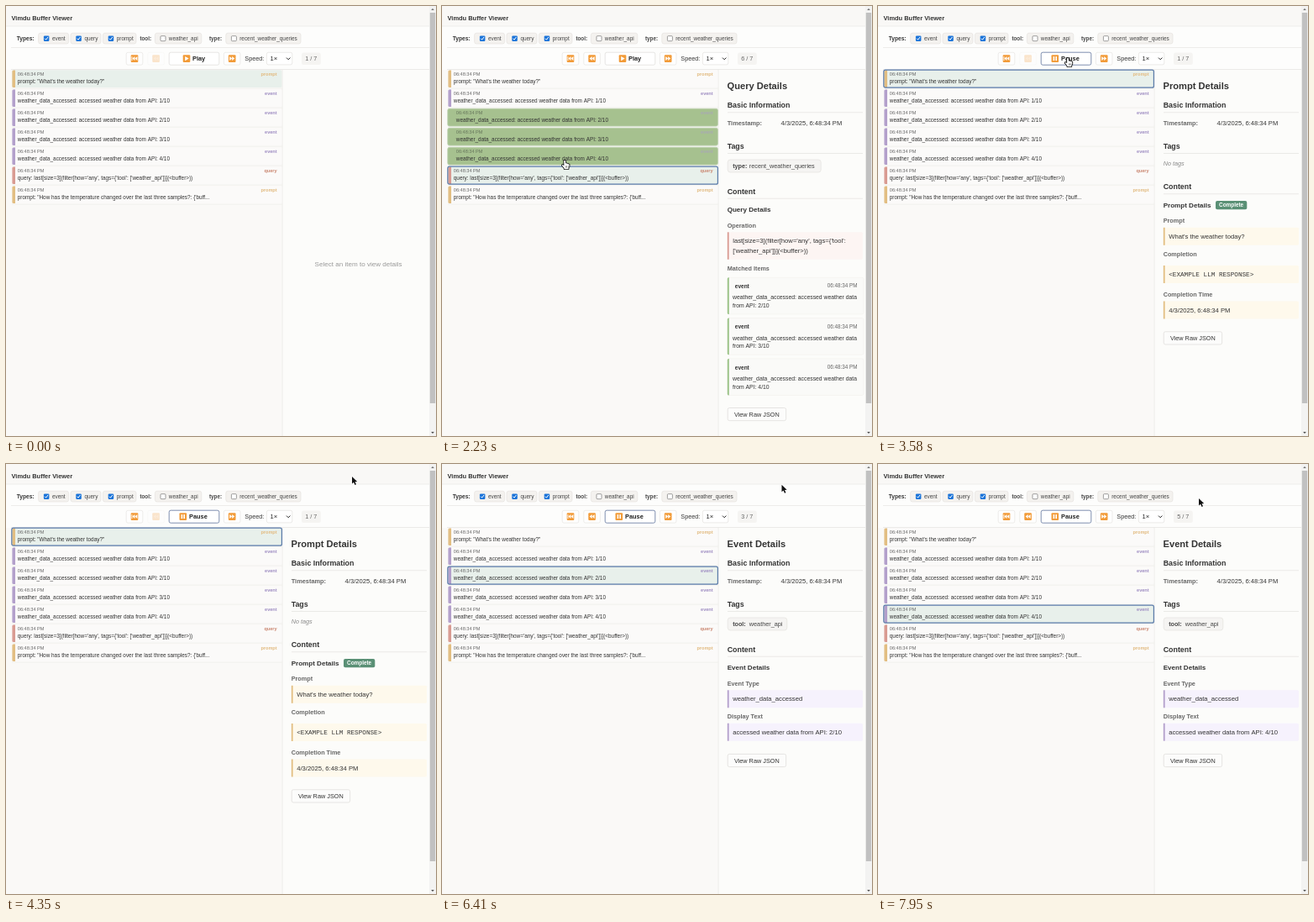
Write an HTML page with a canvas that moves like this. It is 512 by 512 pixels and loops after 8 s.

```html
<!DOCTYPE html>
<html lang="en">
<head>
<meta charset="utf-8">
<title>Buffer Viewer</title>
<style>
html, body { margin: 0; width: 100%; height: 100%; overflow: hidden; background: #faf9f7; }
canvas { display: block; width: 512px; height: 512px; }
</style>
</head>
<body>
<canvas id="stage"></canvas>
<script>
const LOOP = 8000;
const canvas = document.getElementById('stage');
const ctx = canvas.getContext('2d');
const ratio = window.devicePixelRatio || 1;
canvas.width = canvas.height = 512 * ratio;

const SANS = '"Liberation Sans", Arial, sans-serif';
const MONO = '"Liberation Mono", "Courier New", monospace';
const INK = '#333333';
const TONE = {
  prompt: { bar: '#e2be82', label: '#e2bb80', fill: '#fef9ec' },
  event: { bar: '#b3a0cb', label: '#9e8dc2', fill: '#f6f2fd' },
  query: { bar: '#d99b92', label: '#ca8670', fill: '#fdf5f3' }
};
const STAMP = '4/3/2025, 6:48:34 PM';
const CLOCK = '06:48:34 PM';
const reading = n => `accessed weather data from API: ${n}/10`;
const OPERATION = ["last[size=3](filter[how='any', tags={'tool':", "['weather_api']}](<buffer>))"];

const rows = [
  { kind: 'prompt', text: 'prompt: "What\'s the weather today?"' },
  ...[1, 2, 3, 4].map(n => ({ kind: 'event', n, text: 'weather_data_accessed: ' + reading(n) })),
  { kind: 'query', text: 'query: ' + OPERATION.join(' ') },
  { kind: 'prompt', text: 'prompt: "How has the temperature changed over the last three samples?: {\'buff...' }
];

// When each row becomes current: [time, row]
const picks = [[0, 0], [1300, 5], [2760, 0], [4530, 1], [5510, 2], [6490, 3], [7470, 4]];
const PLAY_AT = 3580;

// Pointer tip: [time, x, y]
const path = [
  [250, 440, 505], [800, 147.5, 200], [1710, 147.5, 200], [1910, 147, 197],
  [2130, 147, 197], [2600, 140.5, 87], [3000, 140.5, 87], [3400, 226, 62],
  [3900, 226, 62], [4350, 412, 15], [4780, 412, 15], [4800, 412.6, 17.6],
  [5900, 412.6, 17.6], [5990, 411, 20], [6220, 411, 20], [6560, 400, 28],
  [7150, 400, 28], [7250, 393, 34], [7860, 393, 34], [7950, 382, 41]
];

const clamp = v => Math.max(0, Math.min(1, v));
const ease = v => v * v * (3 - 2 * v);

function text(str, x, y, size, color = INK, style = '', align = 'left', family = SANS) {
  ctx.font = `${style} ${size}px ${family}`;
  ctx.fillStyle = color;
  ctx.textAlign = align;
  ctx.fillText(str, x, y);
}

function rect(x, y, w, h, color) {
  ctx.fillStyle = color;
  ctx.fillRect(x, y, w, h);
}

function box(x, y, w, h, r, fill, stroke, line = 0.6) {
  ctx.beginPath();
  ctx.roundRect(x, y, w, h, r);
  if (fill) { ctx.fillStyle = fill; ctx.fill(); }
  if (stroke) { ctx.strokeStyle = stroke; ctx.lineWidth = line; ctx.stroke(); }
}

function poly(points, fill, stroke, line = 1) {
  ctx.beginPath();
  points.forEach(([x, y]) => ctx.lineTo(x, y));
  ctx.closePath();
  if (stroke) {
    ctx.strokeStyle = stroke;
    ctx.lineWidth = line;
    ctx.lineJoin = 'round';
    ctx.stroke();
  }
  if (fill) { ctx.fillStyle = fill; ctx.fill(); }
}

function open(points, color, line) {
  ctx.beginPath();
  points.forEach(([x, y]) => ctx.lineTo(x, y));
  ctx.strokeStyle = color;
  ctx.lineWidth = line;
  ctx.stroke();
}

function chip(x, w, label, checked) {
  box(x, 32.2, w, 12.8, 2.5, '#f4f2ef', '#e2e0dc');
  const cx = x + 6.3;
  if (checked) {
    box(cx, 35.4, 6.5, 6.5, 1.2, '#1a73d9');
    open([[cx + 1.3, 38.7], [cx + 2.7, 40.2], [cx + 5.2, 36.9]], '#fff', 1);
  } else {
    box(cx + 0.3, 35.7, 6, 6, 1, '#fff', '#777', 0.7);
  }
  text(label, x + 16.4, 40.8, 6.4, '#444');
}

function icon(cx, cy, type) {
  box(cx - 4.3, cy - 4.3, 8.6, 8.6, 1, '#f29b38');
  const tri = (x, d) => poly([[x, cy - 2.5], [x, cy + 2.5], [x + 3 * d, cy]], '#fff');
  if (type === 'first') {
    rect(cx - 3.5, cy - 2.5, 0.9, 5, '#fff');
    tri(cx + 0.4, -1);
    tri(cx + 3.4, -1);
  } else if (type === 'back') {
    tri(cx, -1);
    tri(cx + 3, -1);
  } else if (type === 'next') {
    tri(cx - 3, 1);
    tri(cx, 1);
  } else if (type === 'play') {
    poly([[cx - 1.8, cy - 2.7], [cx - 1.8, cy + 2.7], [cx + 2.7, cy]], '#fff');
  } else {
    rect(cx - 2.2, cy - 2.5, 1.6, 5, '#fff');
    rect(cx + 0.6, cy - 2.5, 1.6, 5, '#fff');
  }
}

function button(x, w, type) {
  box(x, 55.3, w, 14.8, 2, '#fefefe', '#e2e1de');
  icon(x + w / 2, 62.6, type);
}

function drawHeader(index, playing, backAlpha) {
  rect(0, 0, 504, 24, '#f9f8f6');
  rect(0, 24, 504, 52, '#fdfdfc');
  rect(0, 23.7, 504, 0.7, '#e9e8e5');
  rect(6, 49, 498, 0.7, '#e7e6e3');
  rect(6, 75.2, 498, 0.7, '#e4e3e0');
  text('Vimdu Buffer Viewer', 6.5, 16.7, 7.46, INK, 'bold');

  text('Types:', 12.8, 40.9, 6.6, INK, 'bold');
  chip(38.6, 36, 'event', true);
  chip(77, 36, 'query', true);
  chip(115.4, 39.6, 'prompt', true);
  text('tool:', 159.4, 40.9, 6.3, '#444', 'bold');
  chip(177.4, 55.4, 'weather_api', false);
  text('type:', 242, 40.9, 6.3, '#444', 'bold');
  chip(261.8, 89.2, 'recent_weather_queries', false);

  button(143.2, 19.6, 'first');
  ctx.globalAlpha = backAlpha;
  button(168.8, 19.6, 'back');
  ctx.globalAlpha = 1;
  box(194.2, 55.2, 59.6, 15, 2, '#fff', playing ? '#7f8fb0' : '#dddcd9', playing ? 1 : 0.7);
  icon(playing ? 210.8 : 215, 62.6, playing ? 'pause' : 'play');
  text(playing ? 'Pause' : 'Play', playing ? 218 : 222, 65.2, 7.4, '#222', 'bold');
  button(259.4, 19.6, 'next');
  text('Speed:', 284.3, 65.2, 7.25);
  box(310.4, 55.3, 30.4, 14.6, 2, '#fff', '#dddcd9');
  text('1×', 314.5, 65.3, 7.6, '#222');
  open([[334, 61.6], [336.2, 63.8], [338.4, 61.6]], '#222', 1);
  box(352, 55.5, 22.8, 14.4, 2.5, '#f5f4f2');
  text(`${index + 1} / 7`, 363.3, 65.1, 7.25, '#666', '', 'center');
}

function drawRow(i, index, chosen, hover) {
  const row = rows[i], tone = TONE[row.kind], y = 76 + 23 * i;
  const matched = index === 5 && i > 1 && i < 5;
  const current = i === index;
  const shift = matched ? 3 : 0;
  rect(7, y + 21.8, 321.5, 0.6, '#eceae7');
  if (matched) {
    box(6.8, y + 0.3, 321.6, 20.8, 2, '#a6c18f', '#bdd2ae', 0.9);
  } else {
    const fill = current ? '#e8f0eb' : hover ? '#f4f3f0' : '#fbfaf9';
    box(7.2, y + 0.3, 321.2, 20.8, 1.5, fill);
    box(7.4, y + 0.5, 3.6, 20.4, [1.5, 0, 0, 1.5], tone.bar);
    if (current && chosen) box(6.8, y + 0.2, 321.6, 21, 2, null, '#597aa9', 1.2);
  }
  text(CLOCK, 13.8 + shift, y + 7.2, 5.58, matched ? '#66755b' : '#666');
  text(row.kind, 322.6, y + 7.2, 5.58, matched ? '#a9a9b4' : tone.label, 'bold', 'right');
  text(row.text, 13.8 + shift, y + 16.3, 6.4, INK);
}

function heading(str, y) {
  text(str, 339.7, y, 8.85, INK, 'bold');
  rect(340, y + 5.2, 161, 0.7, '#e3e2df');
}

function field(label, lines, y, kind, family = SANS) {
  const tone = TONE[kind], h = 9.5 + 11.5 * lines.length;
  text(label, 339.7, y, 7.25, '#666', 'bold');
  const top = label === 'Completion' ? y + 11 : y + 5.5;
  box(340, top, 161, h, 1.5, tone.fill);
  rect(339.8, top, 1.8, h, tone.bar);
  lines.forEach((s, i) => text(s, 346.2, top + 13 + 11.5 * i, 7.67, INK, '', 'left', family));
}

function rawButton(y) {
  box(340.2, y, 69.4, 15.2, 2, '#fcfcfb', '#dddcd8', 0.7);
  text('View Raw JSON', 374.8, y + 10.3, 7.3, INK, '', 'center');
}

function tagChip(key, value, w) {
  box(340.2, 183, w, 15, 3, '#f5f4f2', '#e4e2de', 0.7);
  text(key, 346.2, 193, 7.2, '#444', 'bold');
  text(value, 365.8, 193, 7.28, '#444');
}

function drawDetails(row) {
  const kind = row.kind;
  const title = kind[0].toUpperCase() + kind.slice(1) + ' Details';
  text(title, 339.6, 99, 11.1, INK, 'bold');
  heading('Basic Information', 121.3);
  text('Timestamp:', 339.7, 141.6, 7.4, '#666', 'bold');
  text(STAMP, 403.6, 141.7, 7.6);
  heading('Tags', 170);

  if (kind === 'prompt') {
    text('No tags', 339.7, 190, 7.2, '#888', 'italic');
    heading('Content', 218.3);
    text(title, 339.7, 239.8, 8.05, INK, 'bold');
    box(402, 232, 37.3, 10.2, 2, '#5a9075');
    text('Complete', 420.6, 239.3, 6.4, '#fff', 'bold', 'center');
    field('Prompt', ["What's the weather today?"], 258.3, kind);
    field('Completion', ['<EXAMPLE LLM RESPONSE>'], 298, kind, MONO);
    field('Completion Time', [STAMP], 346, kind);
    rawButton(387.8);
    return;
  }

  if (kind === 'event') tagChip('tool:', 'weather_api', 70.6);
  else tagChip('type:', 'recent_weather_queries', 111);
  heading('Content', 223.6);
  text(title, 339.7, 245, 8.05, INK, 'bold');

  if (kind === 'event') {
    field('Event Type', ['weather_data_accessed'], 263.8, kind);
    field('Display Text', [reading(row.n)], 303.2, kind);
    rawButton(345.4);
  } else {
    field('Operation', OPERATION, 263.8, kind);
    text('Matched Items', 339.7, 315.2, 7.22, '#666', 'bold');
    [2, 3, 4].forEach((n, i) => {
      const y = 323.3 + 48.3 * i;
      box(340, y, 162, 43.6, 2, '#fafaf8', '#f1f0ed', 0.6);
      box(339.8, y, 2, 43.6, [1.5, 0, 0, 1.5], '#9dc48a');
      text('event', 348.8, y + 12.8, 6.5, INK, 'bold');
      text(CLOCK, 494.6, y + 12, 6.35, '#666', '', 'right');
      text('weather_data_accessed: accessed weather data', 346, y + 26.1, 6.83);
      text(`from API: ${n}/10`, 346, y + 35.7, 6.83);
    });
    rawButton(478.5);
  }
}

function drawScrollbar() {
  rect(504, 0, 8, 512, '#f3f3f2');
  rect(504.8, 8, 6.4, 465, '#c1c1c1');
  poly([[506.2, 5], [509.8, 5], [508, 2.8]], '#777');
  poly([[506.2, 507], [509.8, 507], [508, 509.2]], '#555');
}

function pointerAt(t) {
  if (t < path[0][0]) return null;
  for (let i = 1; i < path.length; i++) {
    const [t0, x0, y0] = path[i - 1], [t1, x1, y1] = path[i];
    if (t < t1) {
      const k = ease(clamp((t - t0) / (t1 - t0)));
      return { x: x0 + (x1 - x0) * k, y: y0 + (y1 - y0) * k };
    }
  }
  const end = path[path.length - 1];
  return { x: end[1], y: end[2] };
}

function drawArrow(x, y) {
  const shape = [[0, 0], [0, 8.6], [2, 6.8], [3.5, 10], [5, 9.3], [3.5, 6.2], [6.2, 6.1]];
  poly(shape.map(([a, b]) => [x + a, y + b]), '#111', '#fff', 1.2);
}

function drawHand(x, y) {
  const shape = [[-0.9, 0.3], [0, -0.2], [0.9, 0.4], [1, 3.4], [2.2, 3.3], [2.7, 3.8], [3.9, 3.8],
    [4.3, 4.3], [5.3, 4.6], [5.3, 7.2], [4.4, 8.6], [4.3, 10.2], [-0.5, 10.2], [-0.9, 8.8],
    [-3.3, 6], [-3.1, 5.1], [-2, 5.2], [-0.9, 6.2]];
  poly(shape.map(([a, b]) => [x + a, y + b]), '#fff', '#111', 1.7);
  [0.9, 2.3, 3.7].forEach(d => rect(x + d, y + 6.4, 0.5, 2.2, '#333'));
}

function draw(t) {
  let p = 0;
  while (p + 1 < picks.length && t >= picks[p + 1][0]) p++;
  const [since, index] = picks[p];
  const before = p ? picks[p - 1][1] : 0;
  const chosen = p > 0;
  const level = i => i ? 1 : 0.25;
  const backAlpha = level(before) + (level(index) - level(before)) * ease(clamp((t - since) / 200));

  const tip = pointerAt(t);
  const inList = tip && tip.x > 7 && tip.x < 328 && tip.y > 76 && tip.y < 236;
  const onPlay = tip && tip.x > 194 && tip.x < 254 && tip.y > 55 && tip.y < 70;
  const hover = inList ? Math.floor((tip.y - 76) / 23) : -1;

  ctx.setTransform(ratio, 0, 0, ratio, 0, 0);
  rect(0, 0, 512, 512, '#faf9f7');
  rect(329, 76, 175, 436, '#fcfcfa');
  rect(328.7, 76, 0.7, 436, '#e8e7e4');
  drawHeader(index, t >= PLAY_AT, backAlpha);
  rows.forEach((_, i) => drawRow(i, index, chosen, i === hover));
  if (chosen) drawDetails(rows[index]);
  else text('Select an item to view details', 419.6, 310.2, 8.07, '#999', '', 'center');
  drawScrollbar();
  if (tip) (inList || onPlay ? drawHand : drawArrow)(tip.x, tip.y);
}

const start = performance.now();
function tick() {
  draw((performance.now() - start) % LOOP);
  requestAnimationFrame(tick);
}
tick();
</script>
</body>
</html>
```
